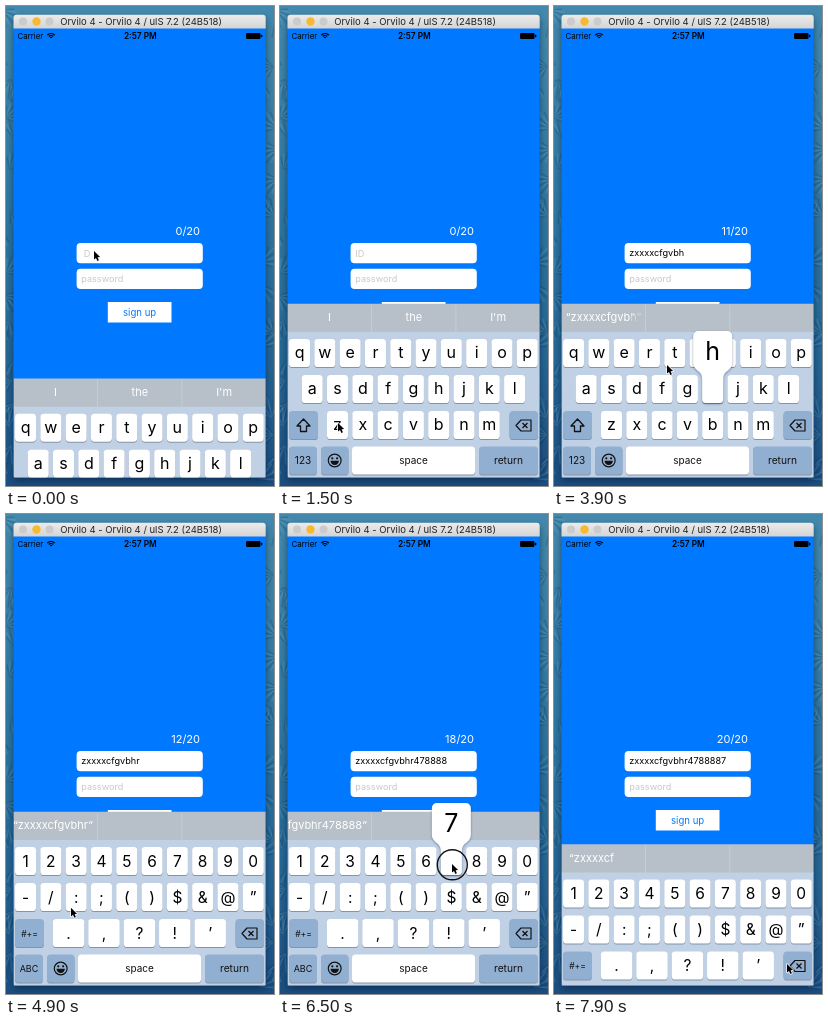
An HTML page with a canvas for the animation above (8 s loop, 268x480 px).

```html
<!DOCTYPE html>
<html lang="en">
<head>
<meta charset="utf-8">
<title>Sign up form</title>
<style>
html, body { margin: 0; width: 100%; height: 100%; overflow: hidden; background: #2d74a0; }
canvas { display: block; width: 268px; height: 480px; }
</style>
</head>
<body>
<canvas id="stage"></canvas>
<script>
const W = 268, H = 480, LOOP = 8000, STEP = 100;
const FONT = 'Inter, Roboto, "Liberation Sans", sans-serif';
const BLUE = '#0078ff';
const LEFT = 7.5, WIDE = 252.2;
const canvas = document.getElementById('stage');
const ratio = window.devicePixelRatio || 1;
canvas.width = W * ratio;
canvas.height = H * ratio;
const ctx = canvas.getContext('2d');

// Press time, pointer position, key
const presses = [
  [1560, 58, 417, 'z'],
  [1790, 83, 418, 'x'], [1930, 83, 418, 'x'], [2070, 84, 418, 'x'], [2210, 84, 418, 'x'],
  [2390, 108, 418, 'c'], [2690, 118, 394, 'f'], [2930, 133, 386, 'g'],
  [3160, 134, 419, 'v'], [3390, 158, 419, 'b'], [3620, 158, 385, 'h'],
  [4010, 97, 350, 'r'], [4600, 23, 455, '123'],
  [5060, 95, 350, '4'], [5330, 172, 351, '7'],
  [5600, 201, 353, '8'], [5720, 203, 353, '8'], [5830, 203, 353, '8'], [6050, 203, 353, '8'],
  [6400, 172, 350, '7'], [6720, 173, 351, '7']
];
const TYPE_LAG = 110, LIMIT = 19;
const NUM_AT = 4710;

// Pointer stays on each key for the length of the press
const path = [[0, 88, 245], [500, 88, 245], [1400, 58, 417]];
for (const [t, x, y] of presses) {
  path.push([t, x, y], [t + 100, x, y]);
  if (t === 3620) path.push([3900, 113, 359]);
}
path.push([7200, 175, 393], [7450, 178, 398], [7900, 233, 450]);

const clamp = (v, a = 0, b = 1) => Math.min(b, Math.max(a, v));
const smooth = u => u * u * (3 - 2 * u);

function pointerAt(t) {
  let i = 0;
  while (i < path.length - 2 && path[i + 1][0] <= t) i++;
  const [t0, x0, y0] = path[i], [t1, x1, y1] = path[i + 1];
  const u = smooth(clamp((t - t0) / (t1 - t0)));
  return [x0 + (x1 - x0) * u, y0 + (y1 - y0) * u];
}

const keyPresses = presses.filter(p => p[3] !== '123');
const countAt = t => keyPresses.filter(p => p[0] + TYPE_LAG <= t).length;
const typed = n => keyPresses.slice(0, Math.min(n, LIMIT)).map(p => p[3]).join('');

// Suggestion states: time, then up to three words
const hints = [[-999, 'I', 'the', "I'm"], [1760, '“z”', 'zz'], [1960, '“zx”', 'zz'], [2640, '“zxx”', 'zzz']];
keyPresses.forEach((p, i) => {
  if (i > 5 && i < LIMIT) hints.push([p[0] + TYPE_LAG + 110, '“' + typed(i + 1) + '”']);
});
hints.push([7650, '“zxxxxcf']);

function rand(seed) {
  return () => (seed = (seed * 16807) % 2147483647) / 2147483647;
}

function box(x, y, w, h, r, color) {
  ctx.fillStyle = color;
  ctx.beginPath();
  ctx.roundRect(x, y, w, h, r);
  ctx.fill();
}

function dot(x, y, r, color) {
  ctx.fillStyle = color;
  ctx.beginPath();
  ctx.arc(x, y, r, 0, 7);
  ctx.fill();
}

function label(s, x, y, size, color, align = 'center', weight = 400) {
  ctx.font = `${weight} ${size}px ${FONT}`;
  ctx.fillStyle = color;
  ctx.textAlign = align;
  ctx.textBaseline = 'alphabetic';
  ctx.fillText(s, x, y);
}

function poly(points, close = true) {
  ctx.beginPath();
  points.forEach(([x, y]) => ctx.lineTo(x, y));
  if (close) ctx.closePath();
}

function stroke(color, width) {
  ctx.strokeStyle = color;
  ctx.lineWidth = width;
  ctx.stroke();
}

function wallpaper() {
  const g = ctx.createLinearGradient(0, 0, 0, H);
  g.addColorStop(0, '#4489ad');
  g.addColorStop(0.4, '#2f78a3');
  g.addColorStop(0.75, '#246594');
  g.addColorStop(1, '#1b4d80');
  ctx.fillStyle = g;
  ctx.fillRect(0, 0, W, H);
  // Fans of leaflets around the edges
  const rnd = rand(41);
  for (let i = 0; i < 44; i++) {
    const x = i % 2 ? 254 + rnd() * 18 : rnd() * 12 - 4;
    const y = (i + rnd()) * H / 44, a = rnd() * 6.3;
    for (let k = 0; k < 9; k++) {
      const b = a + k * 0.24, len = 12 + 8 * Math.sin(k * Math.PI / 8);
      poly([[x, y], [x + Math.cos(b) * len, y + Math.sin(b) * len]], false);
      stroke(k % 2 ? 'rgba(125,185,205,.22)' : 'rgba(10,50,95,.22)', 1.5);
    }
  }
  ctx.save();
  ctx.shadowColor = 'rgba(0,20,50,.55)';
  ctx.shadowBlur = 7 * ratio;
  ctx.shadowOffsetY = 3 * ratio;
  box(LEFT, 9, WIDE, 462.5, 3, BLUE);
  ctx.restore();
}

function windowFrame() {
  const g = ctx.createLinearGradient(0, 9, 0, 23);
  g.addColorStop(0, '#ebebeb');
  g.addColorStop(1, '#d3d3d3');
  box(LEFT, 8.7, WIDE, 13.9, [3, 3, 0, 0], g);
  dot(17, 15.5, 4, '#cbcbcb');
  dot(30.5, 15.5, 4.2, '#f8b932');
  dot(43.5, 15.5, 4, '#cbcbcb');
  label('Orvilo 4 - Orvilo 4 / ulS 7.2 (24B518)', 135, 19, 9.5, '#222');

  label('Carrier', 11.5, 32.8, 7.9, '#000', 'left');
  for (let i = 0; i < 3; i++) {
    ctx.beginPath();
    ctx.arc(45, 32.5, 1 + i * 2, -Math.PI * 0.77, -Math.PI * 0.23);
    stroke('#000', 1.2);
  }
  label('2:57 PM', 134.3, 33, 8.3, '#000', 'center', 600);
  box(240, 27, 14.5, 6, 1.2, '#000');
  box(255, 28.7, 1.3, 2.6, 0.6, '#000');
}

function form(t) {
  const n = countAt(t), text = typed(n);
  label(n + '/20', 194, 229, 11, '#fff', 'right');
  box(70.6, 237, 126.2, 20.2, 4, '#fff');
  box(70.6, 262.7, 126.2, 20.2, 4, '#fff');
  if (text) label(text, 75.3, 250.2, 9.15, '#000', 'left');
  else {
    label('ID', 75.3, 250.5, 9.2, '#c9c9ce', 'left');
    if (t % 1000 < 500) box(75, 240, 2.6, 14, 0, '#fff');
  }
  label('password', 75.3, 276, 9.1, '#c9c9ce', 'left');
  box(101.8, 296, 63.7, 20.5, 0, '#fff');
  label('sign up', 133.6, 310, 9.6, BLUE);
}

const ROWS = [333, 369, 405, 440.5], PITCH = 25.3;

function keysFor(num) {
  const rows = num ? ['1234567890', '-/:;()$&@”', '.,?!’'] : ['qwertyuiop', 'asdfghjkl', 'zxcvbnm'];
  const keys = [];
  rows.forEach((row, r) => {
    const wide = num && r === 2;
    const pitch = wide ? 35.4 : PITCH, w = wide ? 31.5 : 21;
    const first = 133.4 - (row.length - 1) * pitch / 2;
    [...row].forEach((c, i) => keys.push({ c, x: first + i * pitch, y: ROWS[r], w }));
  });
  return keys;
}
const letters = keysFor(false), digits = keysFor(true);

function cap(x, y, w, color) {
  box(x, y + 1, w, 28, 3.6, '#8594a8');
  box(x, y, w, 28, 3.6, color);
}

function sharedStart(a, b) {
  let n = 0;
  while (n < a.length && a[n] === b[n]) n++;
  return n;
}

// Letters that both words share stay solid while the rest cross-fades
function fadeWord(old, word, slot, mix) {
  ctx.font = `400 11px ${FONT}`;
  const width = s => ctx.measureText(s).width;
  const start = s => {
    if (!s.endsWith('”') && s[0] === '“') return 15;
    const w = width(s);
    return w < 76 ? 49.5 + (slot - 1) * 84.3 - w / 2 : 87 - w;
  };
  const put = (s, x, alpha) => {
    ctx.globalAlpha = alpha;
    label(s, x, 315, 11, '#fff', 'left');
    ctx.globalAlpha = 1;
  };
  const n = sharedStart(old, word), head = word.slice(0, n);
  const x = word ? start(word) : start(old), tail = x + width(head);
  put(head, x, 1);
  put(word.slice(n), tail, mix);
  if (mix < 1) put(old.slice(n), n ? tail : start(old), 1 - mix);
}

function suggestions(t) {
  let i = 0;
  while (i < hints.length - 1 && hints[i + 1][0] <= t) i++;
  const now = hints[i], before = hints[i - 1] || now;
  const mix = clamp((t - now[0]) / 150);
  ctx.save();
  ctx.beginPath();
  ctx.rect(LEFT, 298, WIDE, 28);
  ctx.clip();
  for (const slot of [1, 2, 3]) fadeWord(before[slot] || '', now[slot] || '', slot, mix);
  ctx.restore();
}

function functionKeys(num) {
  const tone = '#91afd1';
  cap(9, ROWS[2], 29, tone);
  cap(229.5, ROWS[2], 28.5, tone);
  cap(9, ROWS[3], 28, tone);
  cap(41, ROWS[3], 27.5, tone);
  cap(72, ROWS[3], 123, '#fff');
  cap(199, ROWS[3], 59, tone);
  label(num ? 'ABC' : '123', 23, 458, num ? 9 : 10, '#111');
  label('space', 133.5, 458, 10, '#111');
  label('return', 228.5, 458, 10.2, '#111');
  ctx.lineJoin = 'round';

  if (num) label('#+=', 23.5, 422.5, 8.5, '#111');
  else {
    poly([[23.5, 413], [30, 420], [26.5, 420], [26.5, 425.5], [20.5, 425.5], [20.5, 420], [17, 420]]);
    stroke('#111', 1.3);
  }

  poly([[236, 419.5], [241, 414], [251, 414], [251, 425], [241, 425]]);
  stroke('#111', 1.2);
  poly([[242.5, 417], [247.5, 422]], false);
  stroke('#111', 1.2);
  poly([[247.5, 417], [242.5, 422]], false);
  stroke('#111', 1.2);

  ctx.beginPath();
  ctx.arc(54.7, 454.5, 6.4, 0, 7);
  stroke('#111', 1.2);
  dot(52.3, 452.3, 1.1, '#111');
  dot(57.1, 452.3, 1.1, '#111');
  ctx.beginPath();
  ctx.arc(54.7, 454.8, 4.2, 0, Math.PI);
  ctx.fill();
}

function popup({ c, x, y }) {
  const top = y - 44, l = x - 19.5, r = x + 19.5, kl = x - 10.5, kr = x + 10.5;
  ctx.save();
  ctx.shadowColor = 'rgba(30,50,80,.5)';
  ctx.shadowBlur = 2.5 * ratio;
  ctx.shadowOffsetY = ratio;
  ctx.beginPath();
  ctx.moveTo(l + 5, top);
  ctx.arcTo(r, top, r, top + 9, 5);
  ctx.lineTo(r, top + 32);
  ctx.bezierCurveTo(r, top + 40, kr, top + 39, kr, top + 48);
  ctx.lineTo(kr, y + 24);
  ctx.arcTo(kr, y + 28, kl, y + 28, 4);
  ctx.arcTo(kl, y + 28, kl, y + 10, 4);
  ctx.lineTo(kl, top + 48);
  ctx.bezierCurveTo(kl, top + 39, l, top + 40, l, top + 32);
  ctx.lineTo(l, top + 5);
  ctx.arcTo(l, top, l + 9, top, 5);
  ctx.fillStyle = '#fff';
  ctx.fill();
  ctx.restore();
  label(c, x, top + 28.5, 25, '#000');
}

// Slides up at the start and begins to leave at the end
function slideAt(t) {
  if (t > 7790) return 32.5 * ((t - 7790) / 110) ** 2;
  return t < 700 ? 74.7 * Math.exp(-t / 90) : 0;
}

function keyboard(t) {
  const num = t >= NUM_AT, keys = num ? digits : letters;
  ctx.save();
  ctx.beginPath();
  ctx.rect(LEFT, 23, WIDE, 448.5);
  ctx.clip();
  ctx.translate(0, slideAt(t));
  box(LEFT, 297.7, WIDE, 29, 0, '#b7bfc8');
  box(LEFT, 326, WIDE, 150, 0, '#c0d1e6');
  box(91, 299, 0.8, 27, 0, '#c9d0d8');
  box(175.5, 299, 0.8, 27, 0, '#c9d0d8');
  suggestions(t);
  for (const k of keys) {
    cap(k.x - k.w / 2, k.y, k.w, '#fff');
    label(k.c, k.x, k.y + (num ? 19.6 : 18.8), num ? 15.5 : 16, '#000');
  }
  functionKeys(num);
  const hit = presses.filter(p => t >= p[0] + 50 && t < p[0] + 290).pop();
  const key = hit && keys.find(k => k.c === hit[3]);
  if (key) popup(key);
  ctx.restore();
}

function pointer(t) {
  const [x, y] = pointerAt(t);
  if (presses.some(p => t >= p[0] && t < p[0] + 150)) {
    ctx.beginPath();
    ctx.arc(x + 0.3, y + 0.8, 15, 0, 7);
    stroke('#111', 1.4);
  }
  ctx.save();
  ctx.translate(x, y);
  ctx.lineJoin = 'round';
  poly([[0, 0], [0, 8.6], [2, 6.9], [3.4, 10], [4.9, 9.3], [3.6, 6.3], [6.1, 6.1]]);
  stroke('#fff', 1.4);
  ctx.fillStyle = '#000';
  ctx.fill();
  ctx.restore();
}

function draw(t) {
  ctx.setTransform(ratio, 0, 0, ratio, 0, 0);
  wallpaper();
  windowFrame();
  form(t);
  keyboard(t);
  pointer(t);
}

const start = performance.now();
let last = -1;
function tick(now) {
  const t = Math.floor((Math.max(0, now - start) % LOOP) / STEP) * STEP;
  if (t !== last) draw(last = t);
  requestAnimationFrame(tick);
}
draw(0);
requestAnimationFrame(tick);
</script>
</body>
</html>
```
